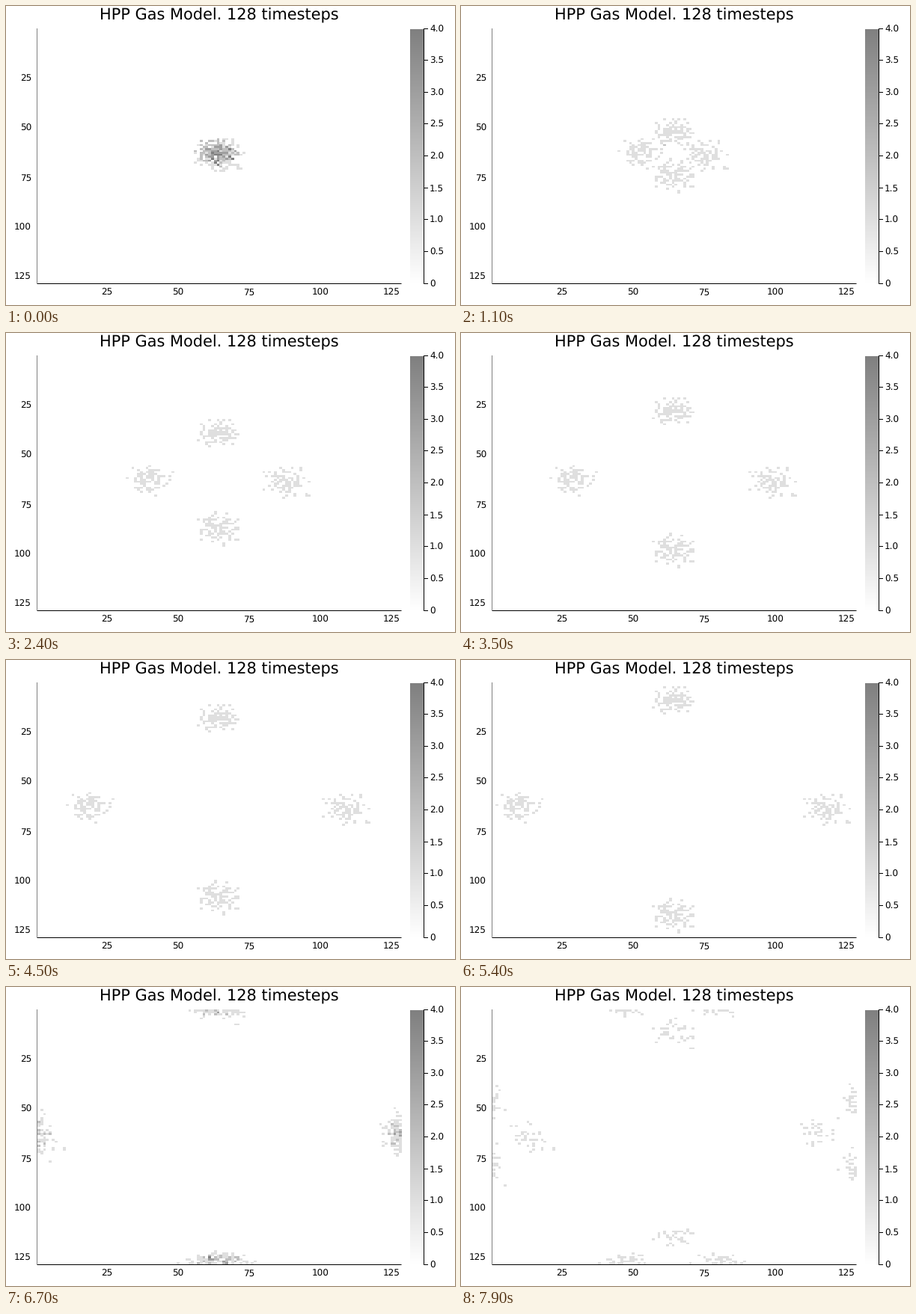
Recreate the animation shown at these times as a matplotlib script. Size 600 by 400 pixels, loop 8000 ms.

```python
import numpy as np
import matplotlib.pyplot as plt
from matplotlib.animation import FuncAnimation
from matplotlib.colors import LinearSegmentedColormap

W, H, DPI = 600, 400, 100
N, FRAMES = 128, 80
X0, Y0, DX, DY = 42.45, 31, 3.797, 2.657   # lattice origin and cell size in px
BAR_TOP, BAR_BOTTOM = 31, 371
PX = 72 / DPI

# Per direction: np.roll arguments for one move
MOVES = {"up": (-1, 0), "down": (1, 0), "left": (-1, 1), "right": (1, 1)}


def seed_gas():
    """One round Gaussian cloud per direction, all in the middle."""
    rng = np.random.default_rng(7)
    gas = {}
    for name in MOVES:
        d = rng.normal(0, 3.5, (100, 2)).clip(-8.4, 8.4)
        col, row = np.round(d + (63.2, 63)).astype(int).T
        gas[name] = np.zeros((N, N), bool)
        gas[name][row, col] = True
    return gas


def step(gas):
    """Head-on pairs turn by 90 degrees, then everything moves one cell."""
    u, d, l, r = (gas[k] for k in MOVES)
    turn = (u & d & ~l & ~r) | (l & r & ~u & ~d)
    return {k: np.roll(g ^ turn, *MOVES[k]) for k, g in gas.items()}


def simulate():
    gas, out = seed_gas(), []
    for _ in range(FRAMES):
        out.append(sum(g.astype(int) for g in gas.values()))
        gas = step(gas)
    return out


density = simulate()

plt.rcParams.update({"font.family": "DejaVu Sans", "text.hinting": "none"})
fig = plt.figure(figsize=(W / DPI, H / DPI), dpi=DPI, facecolor="white")
ax = fig.add_axes([0, 0, 1, 1])
ax.axis("off")
cmap = LinearSegmentedColormap.from_list("fog", ["#ffffff", "#808080"])
shade = dict(cmap=cmap, vmin=0, vmax=4, aspect="auto", interpolation="nearest")


def line(xs, ys, color="black"):
    ax.plot(xs, ys, color=color, lw=PX, solid_capstyle="butt", snap=False)


def label(x, y, text, size=12, ha="center"):
    ax.text(x, y, text, fontsize=size * PX, ha=ha, va="baseline")


image = ax.imshow(density[0], extent=(X0, X0 + N * DX, Y0 + N * DY, Y0), **shade)
ax.imshow(np.linspace(4, 0, 256)[:, None],
          extent=(540, 558, BAR_BOTTOM, BAR_TOP), **shade)

line([41.5, 41.5], [30, 372], "#808080")
line([42, 528.5], [371.5, 371.5])
line([558.5, 558.5], [30, 372])

label(284.6, 18.5, "HPP Gas Model. 128 timesteps", size=20.85)
for v in range(25, N, 25):
    label(X0 + (v - 0.5) * DX - 0.4, 387, str(v))
    label(34, Y0 + (v - 0.5) * DY + 4.4, str(v), ha="right")
for v in np.arange(0, 4.5, 0.5):
    y = np.floor(BAR_BOTTOM - v / 4 * 341) + 0.5
    line([558, 564], [y, y])
    label(566, y + 4.2, f"{v:.1f}" if v else "0", ha="left")

ax.set_xlim(0, W)
ax.set_ylim(H, 0)


def draw(i):
    image.set_data(density[i])
    return [image]


anim = FuncAnimation(fig, draw, frames=FRAMES, interval=100, repeat=True,
                     repeat_delay=0, blit=False)
plt.show()
```
